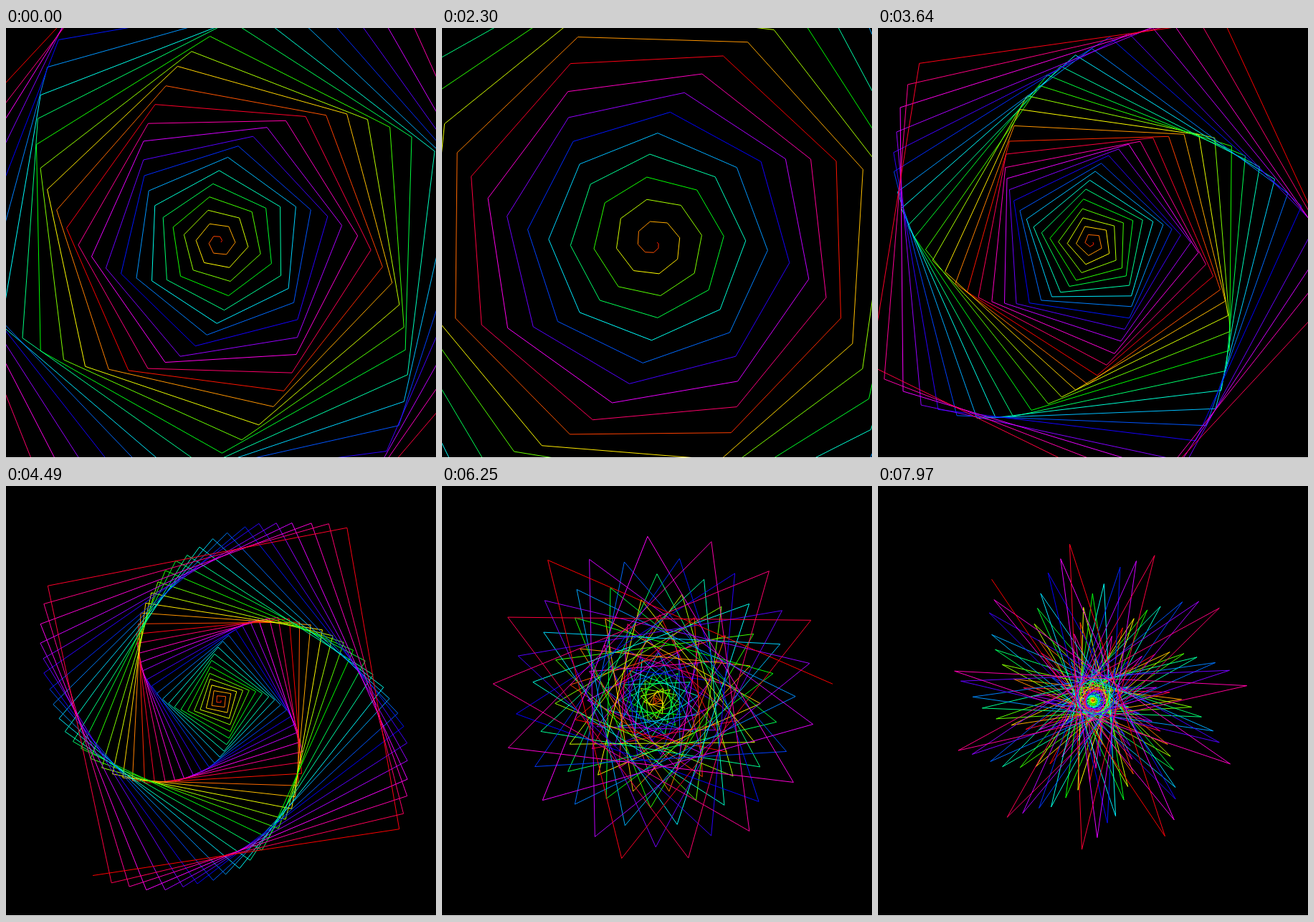
These frames come from a looping animation (600 px wide and 600 px high, 8000 ms). An HTML page with a canvas:

```html
<!DOCTYPE html>
<html lang="en">
<head>
<meta charset="utf-8">
<title>Polyspiral</title>
<style>
  html, body { margin: 0; width: 100%; height: 100%; overflow: hidden; background: #fff; }
  canvas { display: block; width: 600px; height: 600px; }
</style>
</head>
<body>
<canvas id="stage" width="600" height="600"></canvas>
<script>
const ctx = document.getElementById('stage').getContext('2d');
const LOOP = 8000;
const SEGMENTS = 144;
const LAST_STEP = 33;
const FIRST_STEP = 3;

// Moments at which the next spiral appears; until the first, the last spiral of a run is held.
const changes = [1420, 1870, 2300, 2740, 3190, 3640, 4060, 4490,
                 4940, 5350, 5830, 6250, 6670, 7110, 7550, 7970];

const hundredths = v => Math.round(v * 100) / 100;

function drawSpiral(step) {
  const turn = step / (2 * Math.PI);
  let x = 300, y = 299;

  ctx.fillStyle = '#fff';
  ctx.fillRect(0, 0, 600, 600);
  ctx.fillStyle = '#000';
  ctx.fillRect(0, 0, 600, 599);

  ctx.save();
  ctx.beginPath();
  ctx.rect(0, 0, 600, 599);
  ctx.clip();
  ctx.lineWidth = 1;
  for (let i = 1; i <= SEGMENTS; i++) {
    const length = 3 * i;
    ctx.strokeStyle = `hsl(${(5 * i) % 360}, 100%, 50%)`;
    ctx.beginPath();
    ctx.moveTo(x, y);
    // The coarse rounding of the direction makes the spiral drift slightly off centre.
    x += hundredths(Math.cos(turn * i)) * length;
    y += hundredths(Math.sin(turn * i)) * length;
    ctx.lineTo(x, y);
    ctx.stroke();
  }
  ctx.restore();
}

let shown = null;

function tick() {
  const time = performance.now() % LOOP;
  const passed = changes.filter(t => t <= time).length;
  const step = passed ? FIRST_STEP + passed - 1 : LAST_STEP;
  if (step !== shown) drawSpiral(shown = step);
  requestAnimationFrame(tick);
}
tick();
</script>
</body>
</html>
```
